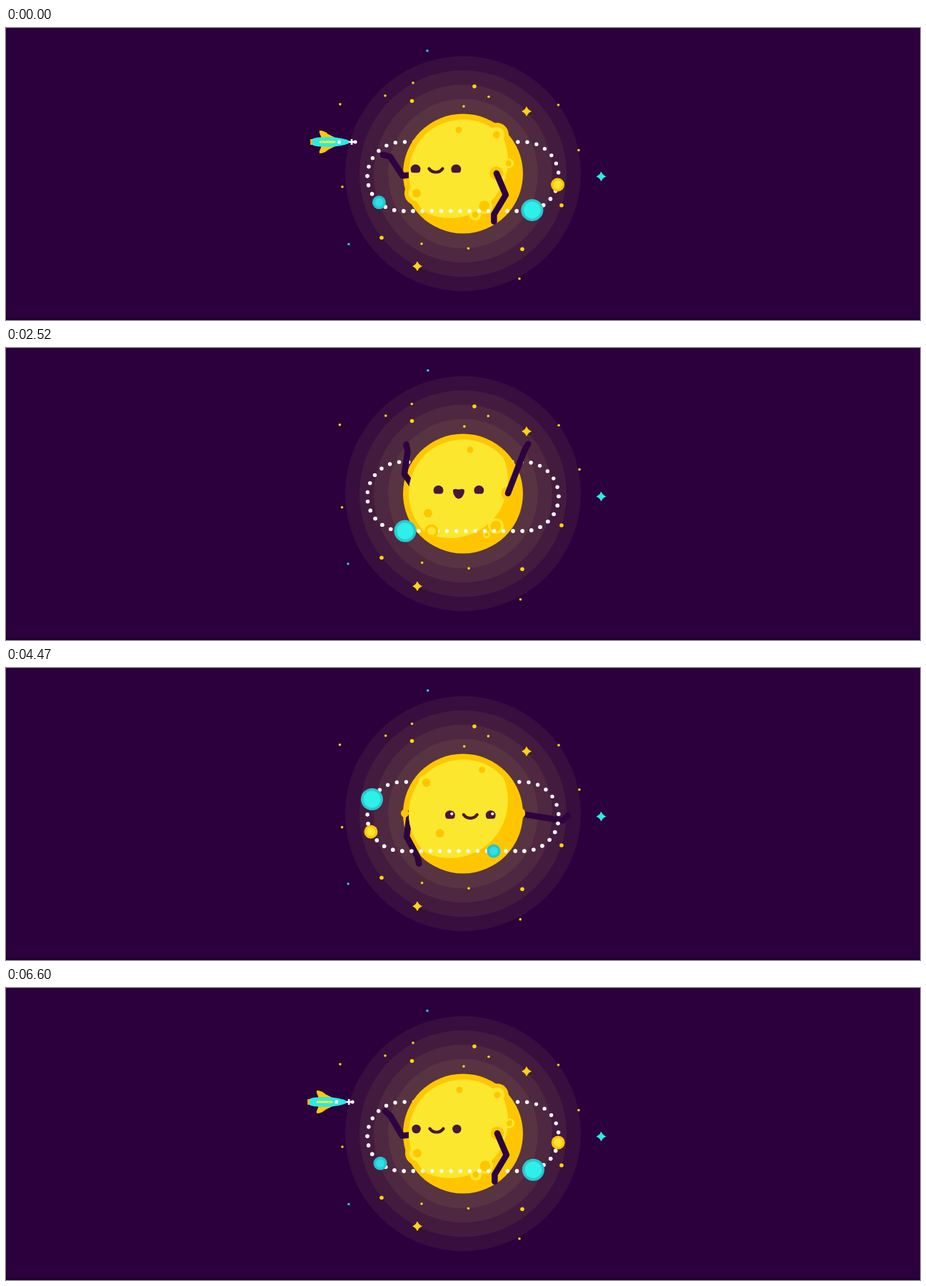
Write an HTML page that moves like this. It is 1280x410 px and loops after 6.63 s.

```html
<!DOCTYPE html>
<html lang="en">
<head>
<meta charset="utf-8">
<title>Sunny orbit</title>
<style>
html, body { margin: 0; width: 100%; height: 100%; overflow: hidden; background: #2b003d; }
svg { display: block; width: 100vw; height: 100vh; }
</style>
</head>
<body>
<svg viewBox="0 0 1280 410">
  <defs>
    <clipPath id="stageClip"><rect x="308" y="0" width="664" height="410"/></clipPath>
    <clipPath id="ball"><circle cx="640" cy="204.5" r="76"/></clipPath>
    <clipPath id="frontHalf"><rect x="460" y="206" width="360" height="80"/></clipPath>
    <path id="track" d="M725.5 257H554.5A48.5 48.5 0 0 1 554.5 160H725.5A48.5 48.5 0 0 1 725.5 257Z"/>
  </defs>
  <rect width="1280" height="410" fill="#2b003d"/>
  <rect y="407" width="1280" height="3" fill="#1f002d"/>
  <g id="halo" fill="#fae650" fill-opacity=".06"></g>
  <g id="stars"></g>
  <use href="#track" class="dots"/>
  <g id="back"></g>
  <g id="bumps" fill="#ffc600"><circle cx="640" cy="204.5" r="84"/></g>
  <g id="armsBack"></g>
  <circle cx="640" cy="204.5" r="76" fill="#ffc600"/>
  <g clip-path="url(#ball)"><circle cx="622" cy="186" r="81" fill="#fbe72d"/></g>
  <g id="craters"></g>
  <g clip-path="url(#ball)"><g id="face" fill="#47173d"></g></g>
  <g clip-path="url(#frontHalf)"><use href="#track" class="dots"/></g>
  <g id="front"></g>
  <g id="armsFront"></g>
</svg>
<script>
const LOOP = 6630, CX = 640, CY = 204.5, RAD = 48.5;
const YELLOW = '#ffd60a', CYAN = '#2ee9e4', LIT = '#fbe72d', GOLD = '#ffc600';
const $ = id => document.getElementById(id);
const clamp = (v, a = 0, b = 1) => Math.min(b, Math.max(a, v));
const pulse = (t, at, width) => Math.exp(-(((t - at) / width) ** 2));

function set(el, attrs) {
  for (const k in attrs) el.setAttribute(k, attrs[k]);
}
function add(parent, tag, attrs = {}) {
  const el = document.createElementNS('http://www.w3.org/2000/svg', tag);
  set(el, attrs);
  return parent.appendChild(el);
}
function moveTo(layer, el) {
  if (el.parentNode !== layer) layer.appendChild(el);
}

// Smooth curve through keys that never overshoots
function curve(ts, vs) {
  const last = vs.length - 1;
  const sec = i => (vs[i + 1] - vs[i]) / (ts[i + 1] - ts[i]);
  const slope = vs.map((_, i) => {
    const a = sec(Math.max(0, i - 1)), b = sec(Math.min(last - 1, i));
    return a * b <= 0 ? 0 : 2 * a * b / (a + b);
  });
  return t => {
    t = clamp(t, ts[0], ts[last]);
    let i = 0;
    while (i < last - 1 && t > ts[i + 1]) i++;
    const h = ts[i + 1] - ts[i], p = (t - ts[i]) / h, q = 1 - p;
    return vs[i] * q * q * (1 + 2 * p) + vs[i + 1] * p * p * (3 - 2 * p)
      + h * p * q * (slope[i] * q - slope[i + 1] * p);
  };
}
const KEYS = [0, 630, 1530, 2520, 3720, 5220, 6600];
const cyclic = (vs, span = 0) => curve(
  [6600 - LOOP, ...KEYS, LOOP, LOOP + 630],
  [vs[6] - span, ...vs, vs[0] + span, vs[1] + span]);

// Halo and stars
const rings = [0, 1, 2, 3].map(() => add($('halo'), 'circle', { cx: CX, cy: CY }));

let seed = 7;
const random = () => (seed = seed * 16807 % 2147483647) / 2147483647;
function star([x, y], r, fill, reach) {
  return {
    x, y, reach, dx: reach * (random() * 2 - 1), dy: reach * (random() * 2 - 1),
    el: add($('stars'), 'circle', { r, fill })
  };
}
const stars = [
  ...[[570, 77], [676, 96.5], [531, 95], [468, 107], [641, 110], [773.5, 108], [802, 171.5],
    [471, 223], [582, 303], [647.5, 309.5], [719, 352]].map(p => star(p, 1.8, YELLOW, 2)),
  ...[[656, 82], [568.5, 102.5], [778, 249], [526, 294.5], [723, 310.5]].map(p => star(p, 2.8, YELLOW, 0)),
  ...[[590, 32], [480, 303.5]].map(p => star(p, 1.8, '#25c9d3', 1.5))
];
[[729, 117, YELLOW], [576, 334.5, YELLOW], [833.5, 208.5, CYAN]].forEach(([x, y, fill]) =>
  add($('stars'), 'path', {
    d: 'M0-6Q1.6-1.6 6 0Q1.6 1.6 0 6Q-1.6 1.6-6 0Q-1.6-1.6 0-6Z',
    transform: `translate(${x} ${y})`, fill, stroke: fill, 'stroke-width': 1.2, 'stroke-linejoin': 'round'
  }));

function drawSky(t) {
  const drift = Math.sin(Math.PI * t / LOOP) ** 2, spread = .055 * pulse(t, 2085, 150);
  rings.forEach((r, i) => set(r, { r: 165 - i * 20 + 3 * pulse(t, 1530, 350) }));
  stars.forEach(s => {
    const k = s.reach ? 1 + spread : 1;
    set(s.el, { cx: CX + (s.x + s.dx * drift - CX) * k, cy: CY + (s.y + s.dy * drift - CY) * k });
  });
}

// Dotted orbit: six gaps per loop
const track = $('track'), length = track.getTotalLength(), gap = length / 49;
const dots = document.querySelectorAll('.dots');
dots.forEach(d => set(d, {
  fill: 'none', stroke: '#fff', 'stroke-width': 5.4, 'stroke-linecap': 'round', 'stroke-dasharray': `0 ${gap}`
}));

// Planets: distances travelled clockwise along the orbit
function planet(r, inner, rim, core, path) {
  const el = add($('front'), 'g');
  add(el, 'circle', { r, fill: rim });
  add(el, 'circle', { r: inner, fill: core });
  return { el, pos: cyclic(path, length) };
}
const planets = [
  planet(9.5, 6, '#25c5d2', '#2ee0e2', [206, 231, 267, 400, 506, 833.5, 850.5]),
  planet(9.5, 6, GOLD, '#ffe32f', [-64.5, -38, .5, 129.5, 175.5, 298.5, 579]),
  planet(15.5, 11.8, '#2bc7d0', '#2ff0e8', [-11.5, 7.5, 34.5, 166.5, 219.5, 349, 633.5])
];

function drawOrbit(t) {
  const p = t / LOOP, phase = 10.3 + 6 * gap * p + 1.6 * Math.sin(Math.PI * p);
  dots.forEach(d => set(d, { 'stroke-dashoffset': -phase }));
  planets.forEach(({ el, pos }) => {
    const s = (pos(t) + length) % length, at = track.getPointAtLength(s);
    set(el, { transform: `translate(${at.x} ${at.y})` });
    moveTo($(s > 300 && s < 520 ? 'back' : 'front'), el);
  });
}

// Rocket, drawn facing right
const rocketLayers = [$('back'), $('front')].map(g => add(g, 'g', { 'clip-path': 'url(#stageClip)' }));
const rocket = add(rocketLayers[0], 'g');
const trail = add(rocket, 'g', { fill: '#33eeea' });
for (let i = 0; i < 12; i++)
  add(trail, 'rect', { x: -264 + i * 20.8, y: -6.5, width: 20.9, height: 13, opacity: Math.min(1, .1 + i * .088) });
add(rocket, 'path', { d: 'M-14-16Q-7-16-2-11L12-4V4L-2 11Q-7 16-14 16Q-15 13-12 8V-8Q-15-13-14-16Z', fill: '#ffc60a' });
add(rocket, 'rect', { x: -27, y: -4, width: 7, height: 8, fill: '#ffb900' });
add(rocket, 'path', { d: 'M-24-4Q-22-7 0-7Q18-6 27-2V2Q18 6 0 7Q-22 7-24 4Z', fill: CYAN });
add(rocket, 'path', { d: 'M-13 0H7', stroke: LIT, 'stroke-width': 3, 'stroke-linecap': 'round' });
add(rocket, 'circle', { cx: 13.5, r: 2.5, fill: '#fff' });
add(rocket, 'path', { d: 'M27 0H35M31-4V4', stroke: '#fff', 'stroke-width': 2.6 });
add(rocket, 'circle', { cx: 36, r: 2.5, fill: '#fff' });

const visit = curve([5550, 6240, LOOP, 7260, 8160, 8730], [270, 382, 453, 510, 806, 1345]);
const flyby = curve([2790, 3450, 3720, 4140], [270, 698, 821, 1281]);

// Along the top, around the right bend, back along the bottom
function route(u) {
  const bend = 725.5, a = clamp((u - bend) / RAD, 0, Math.PI);
  const x = a === 0 ? u : a < Math.PI ? bend + 52 * Math.sin(a) : 2 * bend + Math.PI * RAD - u;
  return [x, 208.5 - RAD * Math.cos(a), a * 180 / Math.PI];
}

function drawRocket(t) {
  const away = t > 2740 && t < 5500;
  const u = visit(t < 2740 ? t + LOOP : t);
  const [x, y, turn] = away ? [flyby(t), 97.5, 0] : route(u);
  set(rocket, { transform: `translate(${x} ${y}) rotate(${turn})` });
  set(trail, { display: away ? 'inline' : 'none' });
  moveTo(rocketLayers[!away && u < 745 ? 0 : 1], rocket);
}

// Sun surface, placed relative to the right shoulder and shrinking towards the rim
const shoulder = cyclic([687, 620, 712, 703, 724, 711, 688]);
function crater(dx, y, dot, ring, bump, rim) {
  const circle = (layer, fill) => add($(layer), 'circle', { cy: y, fill });
  return {
    dx, y, rim,
    parts: [[circle('bumps', GOLD), bump], [circle('craters', LIT), ring], [circle('craters', GOLD), dot]]
  };
}
const craters = [
  crater(-53, 143, 4.5, 0, 0, 80),
  crater(-131, 161, 6, 11, 16, 80),
  crater(-112, 232, 6, 11, 17, 80),
  crater(0, 150, 5, 11, 17, 80),
  crater(17, 190, 4, 7, 0, 76),
  crater(-17, 250, 7.5, 11, 0, 73),
  crater(-30, 262, 4.5, 8.5, 0, 71),
  crater(0, 204, 9.5, 0, 9.5, 86),
  crater(-161, 204, 9.5, 0, 9.5, 86)
];
function drawSurface(t) {
  craters.forEach(c => {
    const cx = shoulder(t) + c.dx, size = clamp((c.rim - Math.hypot(cx - CX, c.y - CY)) / 8);
    c.parts.forEach(([el, r]) => set(el, { cx, r: r * size }));
  });
}

// Arms: three bones, each with its own swing in degrees
const BONES = [33, 32, 10];
function arm(side, dx, ...swings) {
  return {
    side, dx, swings: swings.map(s => cyclic(s)),
    el: add($('armsBack'), 'path', {
      fill: 'none', stroke: '#2d0440', 'stroke-width': 8.6, 'stroke-linecap': 'round', 'stroke-linejoin': 'round'
    })
  };
}
const arms = [
  arm(1, 0,
    [67, 102, 13, -69, -51, 62, 67],
    [121, 147, 13, -69, -106, 124, 121],
    [90, 79, 45, -60, -117, 38, 90]),
  arm(-1, -161,
    [174, 165, 210, 235, 92, 109, 174],
    [237, 200, 171, 278, 59, 70, 240],
    [195, 180, 168, 260, 90, 73, 222])
];
function drawArm({ side, dx, swings, el }, t) {
  let x = shoulder(t) + dx, y = 204;
  const past = (x - CX) * side - 77.5;
  if (past > 0) x -= side * past * 1.7; // the shoulder comes back behind the disc
  let d = `M${x} ${y}`;
  swings.forEach((swing, i) => {
    const a = swing(t) * Math.PI / 180;
    x += BONES[i] * Math.cos(a);
    y += BONES[i] * Math.sin(a);
    d += `L${x} ${y}`;
  });
  set(el, { d });
  moveTo($(past > 0 ? 'armsBack' : 'armsFront'), el);
}

// Face
const faceY = cyclic([198, 201, 204.5, 199.5, 203.5, 208, 198]);
const EYE = {
  round: 'M-6.2 0A6.2 6.2 0 1 1 6.2 0A6.2 6.2 0 1 1-6.2 0Z',
  wide: 'M-6.6 0A6.6 5.3 0 1 1 6.6 0A6.6 5.3 0 1 1-6.6 0Z',
  dome: 'M-5.4 4.8Q-6.9 3-6.9 0A6.9 6.4 0 0 1 6.9 0Q6.9 3 5.4 4.8Q0 5.8-5.4 4.8Z'
};
const MOUTH = {
  smile: 'M-9.5-.5Q-6 4.5 0 4.5Q6 4.5 9.5-.5',
  oh: 'M-5.2 3.8A5.2 4.2 0 1 1 5.2 3.8A5.2 4.2 0 1 1-5.2 3.8Z',
  open: 'M-8 1Q-8-2-4-1.5Q0-.5 4-1.5Q8-2 8 1Q8 6 4 10.5Q0 14-4 10.5Q-8 6-8 1Z'
};
// start, eyes, mouth, glint
const moods = [
  [0, 'dome', 'smile', 0], [1100, 'wide', 'oh', 0], [1900, 'dome', 'open', 0],
  [3000, 'dome', 'smile', 1], [4500, 'round', 'smile', 0]
];
const eyes = [-28.4, 28.4].map(x => add($('face'), 'path', { transform: `translate(${x} 0)` }));
const mouth = add($('face'), 'path', { stroke: '#47173d', 'stroke-linecap': 'round' });
const glints = [-26, 31].map(cx => add($('face'), 'circle', { cx, cy: -1.6, r: 2.1, fill: '#fff' }));

function drawFace(t) {
  const [, eye, lips, glint] = moods.filter(m => m[0] <= t).pop();
  const smile = lips === 'smile';
  const x = shoulder(t) - 69 - 16 * Math.cos(Math.PI * t / LOOP) ** 6;
  set($('face'), { transform: `translate(${x} ${faceY(t)})` });
  eyes.forEach(e => set(e, { d: EYE[eye] }));
  set(mouth, { d: MOUTH[lips], fill: smile ? 'none' : '#47173d', 'stroke-width': smile ? 4.2 : 0 });
  glints.forEach(g => set(g, { opacity: glint }));
}

function draw(t) {
  drawSky(t);
  drawOrbit(t);
  drawRocket(t);
  drawSurface(t);
  arms.forEach(a => drawArm(a, t));
  drawFace(t);
}

const start = performance.now();
function tick(now) {
  draw(Math.max(0, now - start) % LOOP);
  requestAnimationFrame(tick);
}
draw(0);
requestAnimationFrame(tick);
</script>
</body>
</html>
```
